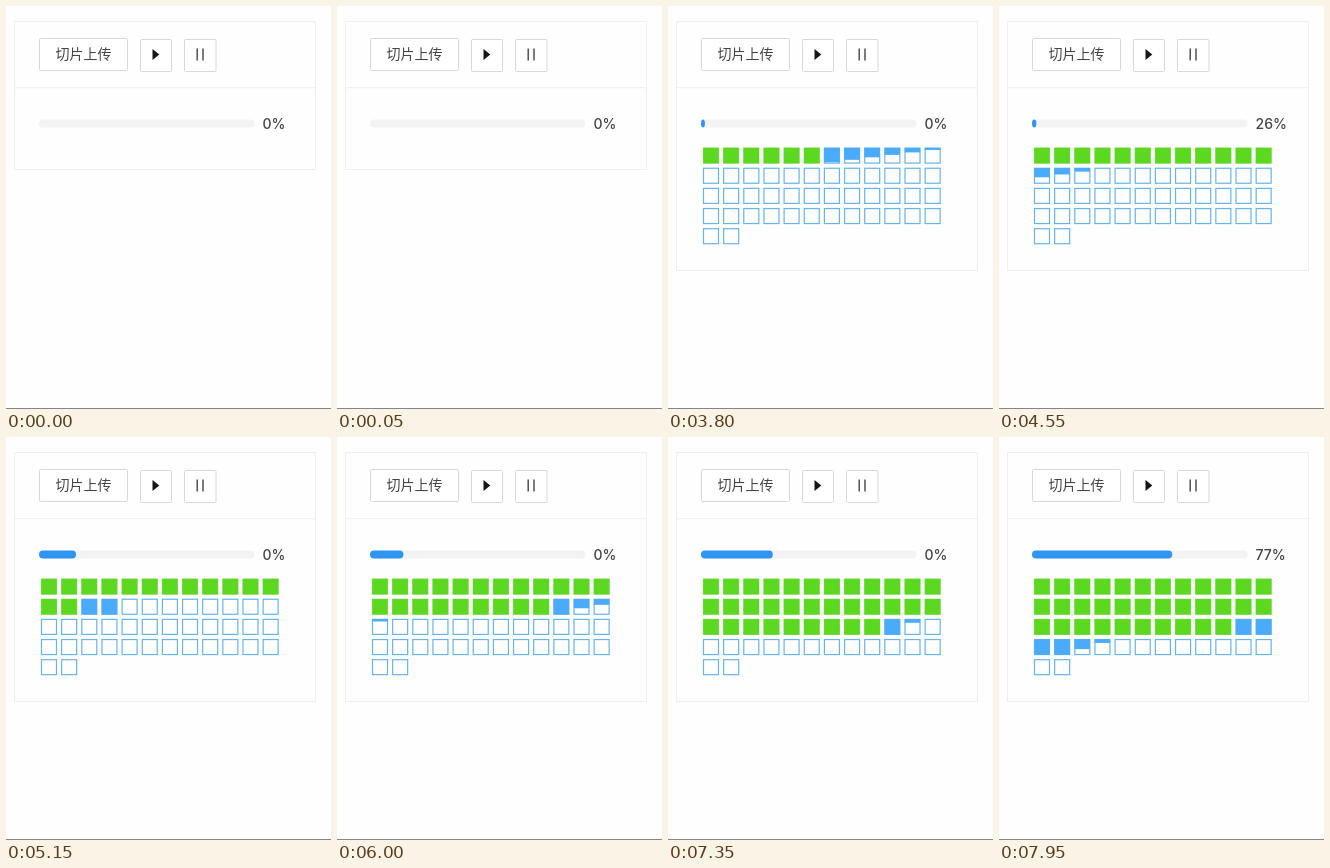
An HTML page that plays this animation: 325 px wide and 403 px high, repeating every 8 s.

```html
<!DOCTYPE html>
<html lang="zh">
<head>
<meta charset="utf-8">
<style>
html, body { margin: 0; width: 100%; height: 100%; overflow: hidden; background: #fefefe; }
svg { display: block; width: 325px; height: 403px; }
text { font: 500 14px Inter, "Noto Sans CJK SC", "Noto Sans CJK", sans-serif; fill: #444; }
.card { fill: #fefefe; stroke: #efefef; }
.button { fill: #fff; stroke: #d8d8d8; }
.cell { fill: #fff; stroke: #68b3e8; stroke-width: 1.2; }
.fill { fill: #4aabfa; }
.done .cell { stroke: #8fdd6c; }
.done .fill { fill: #5bd81f; }
</style>
</head>
<body>
<svg viewBox="0 0 325 403">
  <rect class="card" id="card" x="8.5" y="15.5" width="301" height="148"/>
  <path d="M9 81.7H309" stroke="#efefef"/>
  <g class="button">
    <rect x="33.5" y="32.5" width="88" height="32" rx="1"/>
    <rect x="134.5" y="33.5" width="31" height="32" rx="1"/>
    <rect x="178.5" y="33.5" width="31.5" height="32" rx="1"/>
  </g>
  <text x="77.5" y="53" text-anchor="middle">切片上传</text>
  <path d="M146.5 43L153.3 48.5L146.5 54Z" fill="#161616"/>
  <path d="M191.2 42.5v12M197 42.5v12" stroke="#444" stroke-width="1.4"/>
  <rect x="33" y="113.5" width="215.5" height="8" rx="4" fill="#f3f3f3"/>
  <rect id="bar" x="33" y="113.5" height="8" rx="4" fill="#3095f2"/>
  <text id="label" x="256.5" y="122.5"></text>
  <g id="grid"></g>
  <path d="M0 402.5H325" stroke="#858585"/>
</svg>
<script>
const LOOP = 8000, STEP = 50, SHOW = 3050;
const COUNT = 50, COLS = 12, PITCH = 20.15, SIZE = 16;
const FILL = 300, CONFIRM = 700;
const BAR = 215.5, BAR_TIME = 400;

// Upload pace: [chunk, start time], linear in between.
const pace = [
  [5, 2930], [6, 3520], [11, 3760], [12, 4370], [14, 4480], [16, 5160],
  [20, 5280], [22, 5820], [26, 6090], [32, 6510], [34, 7280], [40, 8000]
];

// The label switches in turn to the real total and back to zero.
const flips = [2945, 3550, 4515, 5040, 5440, 5845, 6695, 7230, 7735];

const $ = id => document.getElementById(id);
const clamp = v => Math.min(1, Math.max(0, v));

function startOf(i) {
  const n = pace.findIndex(([chunk]) => chunk >= i);
  if (n < 1) return pace.at(n)[1];
  const [[c0, t0], [c1, t1]] = pace.slice(n - 1, n + 1);
  return t0 + (t1 - t0) * (i - c0) / (c1 - c0);
}

// CSS "ease": cubic-bezier(.25, .1, .25, 1), solved by bisection.
function ease(x) {
  const curve = (a, b, s) => 3 * a * s * (1 - s) ** 2 + 3 * b * s * s * (1 - s) + s ** 3;
  let s = .5;
  for (let d = .25; d > 1e-4; d /= 2) s += curve(.25, .25, s) < x ? d : -d;
  return curve(.1, 1, s);
}

function make(parent, tag, attrs = {}) {
  const el = document.createElementNS("http://www.w3.org/2000/svg", tag);
  for (const key in attrs) el.setAttribute(key, attrs[key]);
  return parent.appendChild(el);
}

const cells = Array.from({ length: COUNT }, (_, i) => {
  const x = 35 + (i % COLS) * PITCH;
  const y = 141.6 + Math.floor(i / COLS) * PITCH;
  const group = make($("grid"), "g");
  make(group, "rect", { class: "cell", x: x + .5, y: y + .5, width: SIZE - 1, height: SIZE - 1 });
  const fill = make(group, "rect", { class: "fill", x: x + .3, y: y + .3, width: SIZE - .6 });
  return { group, fill, start: startOf(i) };
});

function draw(t) {
  const open = t >= SHOW;
  $("card").setAttribute("height", open ? 249 : 148);
  $("grid").style.display = open ? "" : "none";

  let sum = 0;
  for (const { group, fill, start } of cells) {
    const part = clamp((t - start) / FILL);
    sum += part;
    fill.setAttribute("height", (SIZE - .6) * part);
    group.classList.toggle("done", t >= start + CONFIRM);
  }

  const total = open ? sum / COUNT : 0;
  const past = flips.filter(flip => flip <= t);
  const real = past.length % 2 === 1;
  const moved = open ? ease(clamp((t - past.at(-1)) / BAR_TIME)) : 0;
  $("label").textContent = (real ? Math.floor(total * 100) : 0) + "%";
  $("bar").setAttribute("width", BAR * total * (real ? moved : 1 - moved));
}

function tick() {
  const t = performance.now() % LOOP;
  draw(Math.floor(t / STEP) * STEP);
  requestAnimationFrame(tick);
}
tick();
</script>
</body>
</html>
```
